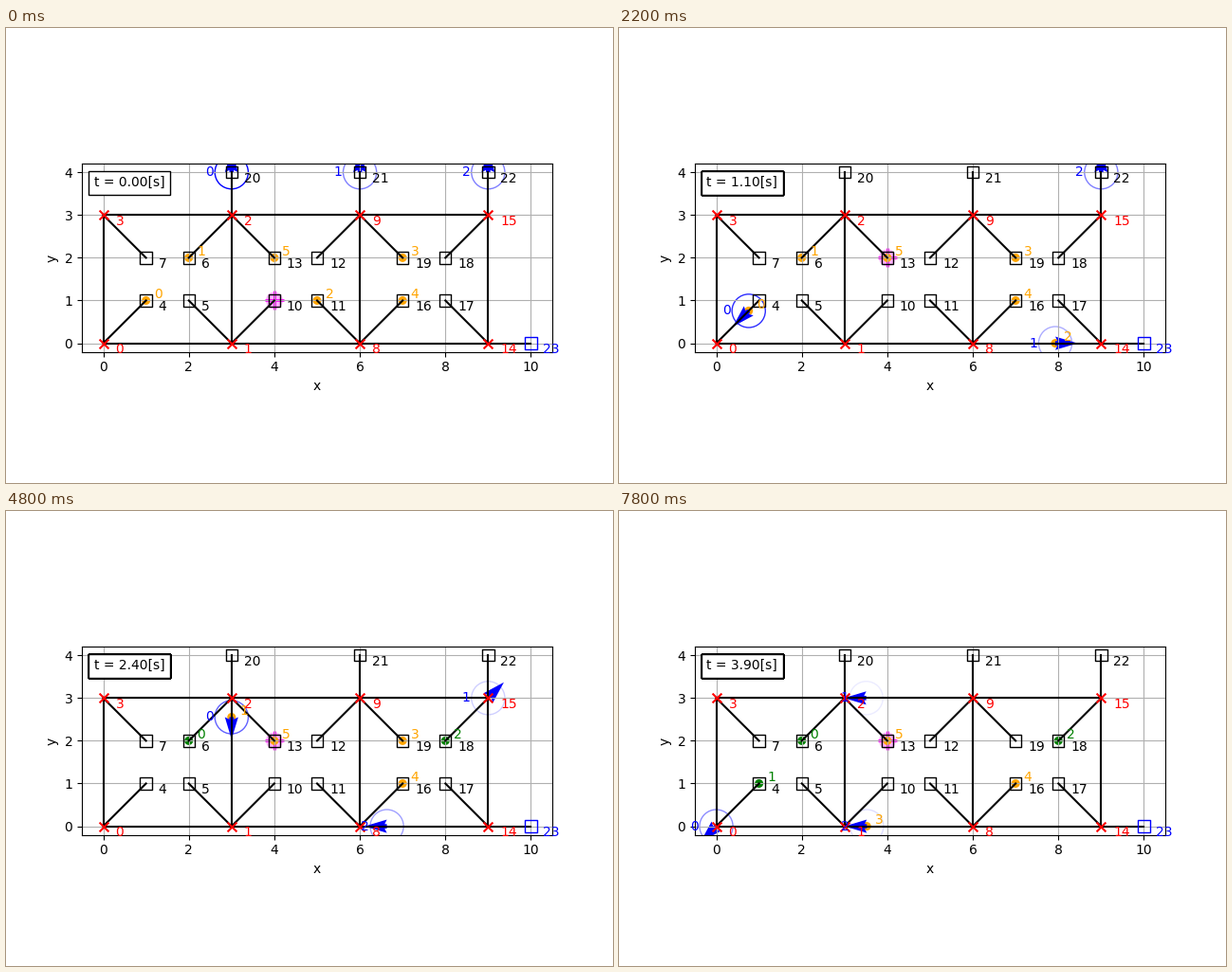
A matplotlib script that plays this animation: 640 by 480 pixels, repeating every 8000 ms.

```python
import numpy as np
import matplotlib.pyplot as plt
from matplotlib.animation import FuncAnimation
from matplotlib.patches import Circle

FRAMES, INTERVAL, DT = 40, 200, 0.1
SPEED = 7.96          # grid units per second
DRAIN = 0.02          # ring opacity lost per unit travelled
CELLS, SIDE = 3, 3
HALF_PX = 0.5 * 11 / 496


def build_map():
    """Square cells, each with four bays reached diagonally from its corners."""
    nodes, edges, crossings = [], set(), set()

    def add(point):
        if point not in nodes:
            nodes.append(point)
        return nodes.index(point)

    def link(a, b):
        edges.add((min(a, b), max(a, b)))

    signs = [(0, 0), (1, 0), (1, 1), (0, 1)]
    for cell in range(CELLS):
        spots = [(SIDE * (cell + u), SIDE * v) for u, v in signs]
        corners = [add(p) for p in spots]
        crossings.update(corners)
        for k, ((x, y), (u, v)) in enumerate(zip(spots, signs)):
            link(corners[k], corners[k - 1])
            link(corners[k], add((x + 1 - 2 * u, y + 1 - 2 * v)))
    for cell in range(1, CELLS + 1):
        link(nodes.index((SIDE * cell, SIDE)), add((SIDE * cell, SIDE + 1)))
    link(nodes.index((SIDE * CELLS, 0)), add((SIDE * CELLS + 1, 0)))
    return np.array(nodes, float), sorted(edges), crossings


NODES, EDGES, CROSSINGS = build_map()
LAST = len(NODES) - 1

# per vehicle: trips of (departure time, key stops)
TRIPS = [
    [(0, (20, 3, 4, 1, 6, 1, 4, 0))],
    [(0, (21, 11, 14, 18, 15)), (3.21, (15, 2))],
    [(1.6, (22, 14, 8, 19, 8, 0))],
]
CHARGE = (1.0, 0.5, 0.5)
BOX_HOME = (4, 6, 11, 19, 16, 13)
# box: (vehicle, drop node)
HAULS = {0: (0, 6), 1: (0, 4), 2: (1, 18), 3: (2, None)}


def shortest(a, b):
    paths = [[a]]
    for path in paths:
        if path[-1] == b:
            return path
        for edge in EDGES:
            if path[-1] in edge:
                other = sum(edge) - path[-1]
                if other not in path:
                    paths.append(path + [other])


class Route:
    def __init__(self, trips):
        self.times, self.stops, self.dist = [], [], []
        travelled = 0.0
        for now, keys in trips:
            path = [keys[0]]
            for a, b in zip(keys, keys[1:]):
                path += shortest(a, b)[1:]
            last = path[0]
            for node in path:
                step = np.hypot(*(NODES[node] - NODES[last]))
                now += step / SPEED
                travelled += step
                self.times.append(now)
                self.stops.append(node)
                self.dist.append(travelled)
                last = node
        self.xy = NODES[self.stops]

    def pos(self, t):
        return np.array([np.interp(t, self.times, c) for c in self.xy.T])

    def travelled(self, t):
        return np.interp(t, self.times, self.dist)

    def heading(self, t):
        way = np.array([0.0, 1.0])
        for start, d in zip(self.times, np.diff(self.xy, axis=0)):
            if t > start and d.any():
                way = d / np.hypot(*d)
        return way

    def haul_times(self, pick, drop):
        i = self.stops.index(pick)
        end = np.inf if drop is None else self.times[self.stops.index(drop, i)]
        return self.times[i], end


routes = [Route(trips) for trips in TRIPS]


def box_state(box, t):
    home = BOX_HOME[box]
    if box in HAULS:
        who, drop = HAULS[box]
        start, end = routes[who].haul_times(home, drop)
        if t >= end:
            return NODES[drop], "green"
        if t >= start:
            return routes[who].pos(t), "orange"
    return NODES[home], "orange"


def place(label, x, y):
    label.set_position((x - HALF_PX, y + HALF_PX))


fig, ax = plt.subplots(figsize=(6.4, 4.8), dpi=100)
ax.set_aspect("equal")
ax.set_xlim(-0.5, 10.5)
ax.set_ylim(-0.2, 4.2)
ax.set_xlabel("x")
ax.set_ylabel("y")
ax.set_xticks(range(0, 11, 2))
ax.set_yticks(range(5))
ax.grid(True)

for edge in EDGES:
    ax.plot(*NODES[list(edge)].T, color="black", lw=1.5)

for i, (x, y) in enumerate(NODES):
    if i in CROSSINGS:
        color = "red"
        ax.scatter(x, y, s=50, marker="x", color=color, lw=1.5, zorder=2.1)
    else:
        color = "blue" if i == LAST else "black"
        ax.scatter(x, y, s=80, marker="s", facecolor="none", edgecolor=color,
                   lw=1, zorder=2.1)
    place(ax.text(0, 0, str(i), color=color), x + 0.3, y - 0.25)

halo = ax.add_patch(Circle((0, 0), 0.2, color="magenta", lw=0, alpha=0.3,
                           zorder=0.9))
plus, = ax.plot([], [], "+", color="magenta", ms=15, mew=2, zorder=0.9)

dots = [ax.add_patch(Circle((0, 0), 0.1, lw=0)) for _ in BOX_HOME]
dot_tags = [ax.text(0, 0, str(i)) for i in range(len(dots))]
rings = [ax.add_patch(Circle((0, 0), 0.39, fill=False, ec="blue", lw=1))
         for _ in routes]
ring_tags = [ax.text(0, 0, str(i), color="blue") for i in range(len(rings))]
arrows = ax.quiver(np.zeros(3), np.zeros(3), np.zeros(3), np.ones(3),
                   color="blue", width=0.01, angles="uv", scale_units="xy",
                   scale=1, zorder=1.2)

# the clock box is painted once more each step, so its border thickens
clocks = [ax.text(0.1005, 0.8985, "", transform=ax.transAxes, ha="center",
                  va="center", zorder=4,
                  bbox=dict(boxstyle="square,pad=0.42", facecolor="white"))
          for _ in range(25)]


def update(n):
    t = n * DT
    for k, clock in enumerate(clocks):
        clock.set_text(f"t = {t:.2f}[s]")
        clock.set_visible(k <= n)

    goal = NODES[10 if n == 0 else 13]
    halo.set_center(goal)
    plus.set_data(goal[:1], goal[1:])

    for i, (dot, tag) in enumerate(zip(dots, dot_tags)):
        (x, y), color = box_state(i, t)
        dot.set_center((x, y))
        dot.set_facecolor(color)
        place(tag, x + 0.2, y + 0.05)
        tag.set_color(color)

    spots = np.array([r.pos(t) for r in routes])
    ways = 0.52 * np.array([r.heading(t) for r in routes])
    for i, (x, y) in enumerate(spots):
        rings[i].set_center((x, y))
        rings[i].set_alpha(max(0, CHARGE[i] - DRAIN * routes[i].travelled(t)))
        place(ring_tags[i], x - 0.6, y - 0.1)
    arrows.set_offsets(spots)
    arrows.set_UVC(*ways.T)
    return []


anim = FuncAnimation(fig, update, frames=FRAMES, interval=INTERVAL,
                     repeat=True, repeat_delay=0, blit=False)
plt.show()
```
